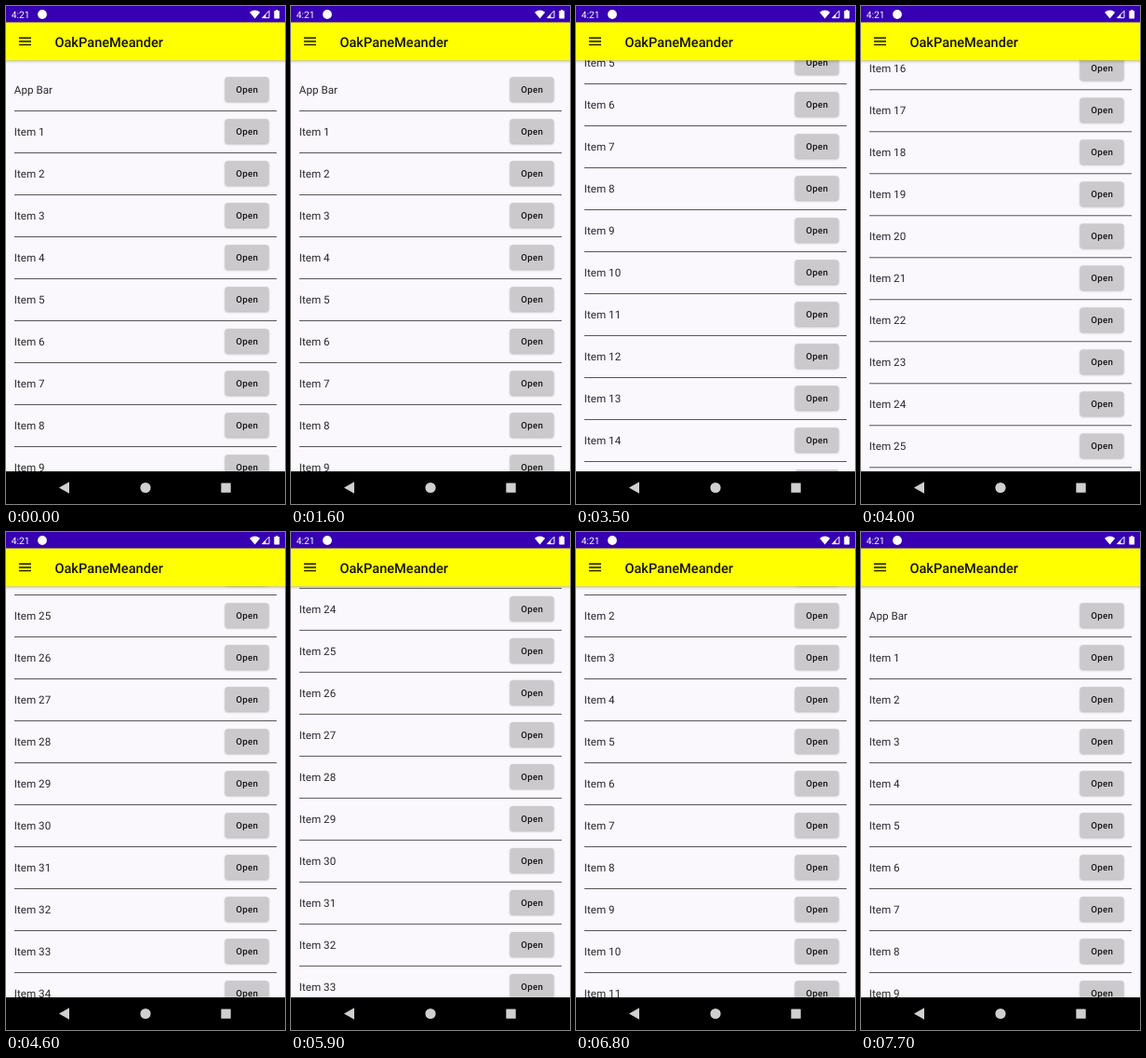
These frames come from a looping animation (300x534 px, 8000 ms). An HTML page:

```html
<!DOCTYPE html>
<html lang="en">
<head>
<meta charset="utf-8">
<title>Scrolling list</title>
<style>
  html, body { margin: 0; width: 100%; height: 100%; overflow: hidden; background: #000; }
  svg { display: block; width: 300px; height: 534px; font-family: Roboto, sans-serif; text-rendering: geometricPrecision; }
  .label { font-size: 11.67px; fill: #29282a; }
  .open { font-size: 9.7px; font-weight: 500; letter-spacing: .3px; text-anchor: middle; fill: #161617; }
  .title { font-size: 14.6px; font-weight: 500; fill: #141400; }
  .clock { font-size: 10.2px; fill: #fff; }
</style>
</head>
<body>
<svg viewBox="0 0 300 534">
  <defs>
    <filter id="soft" x="-20%" y="-30%" width="140%" height="160%">
      <feGaussianBlur stdDeviation="0.8"/>
    </filter>
    <linearGradient id="shade" x1="0" y1="0" x2="0" y2="1">
      <stop offset="0" stop-color="#000" stop-opacity=".3"/>
      <stop offset=".4" stop-color="#000" stop-opacity=".1"/>
      <stop offset="1" stop-color="#000" stop-opacity="0"/>
    </linearGradient>
    <g id="button">
      <rect x="235.6" y="77" width="46.8" height="26.2" rx="2.9" fill="#000" opacity=".3" filter="url(#soft)"/>
      <rect x="235.6" y="76.2" width="46.8" height="26.2" rx="2.9" fill="#cbc9cc"/>
      <text class="open" x="259.2" y="93.2">Open</text>
    </g>
  </defs>

  <rect width="300" height="534" fill="#faf8fc"/>
  <g id="list"></g>

  <rect y="58" width="300" height="4" fill="url(#shade)"/>
  <rect y="17" width="300" height="41.3" fill="#ff0"/>
  <path d="M13.9 34.3H27M13.9 37.9H27M13.9 41.6H27" stroke="#1a1a00" stroke-width="1.45"/>
  <text class="title" x="52.4" y="43.7">OakPaneMeander</text>

  <rect width="300" height="17.5" fill="#3700b3"/>
  <text class="clock" x="5.8" y="13">4:21</text>
  <g fill="#fff">
    <circle cx="39" cy="9" r="4.9"/>
    <path d="M262 6.8Q267.6 2.2 273.2 6.8L267.6 13.4Z"/>
    <path d="M283 5.2V12.7H275.5Z" fill="none" stroke="#fff"/>
    <path d="M279.4 8.8V12.7H275.5Z"/>
    <path d="M290.2 4h2v1h1.3q.6 0 .6.6v7.2q0 .6-.6.6h-4.6q-.6 0-.6-.6V5.6q0-.6.6-.6h1.3z"/>
  </g>

  <rect y="499" width="300" height="35" fill="#000"/>
  <g fill="#d0d0d0">
    <path d="M57 516.5L68 510.2V522.8Z"/>
    <circle cx="150" cy="516.5" r="5.6"/>
    <rect x="231.3" y="511.4" width="10.4" height="10.4" rx=".6"/>
  </g>
</svg>
<script>
  const LOOP = 8000, STEP = 100, ROW = 45, ROWS = 38;
  const list = document.getElementById('list');

  // Each swipe moves the list to a new offset; rise and settle shape its start and end.
  const swipes = [
    { start: 1800, length: 900, to: 119, rise: 2, settle: 2 },
    { start: 3200, length: 1600, to: 1139, rise: 1.79, settle: 2.77 },
    { start: 5700, length: 1400, to: 0, rise: 2.1, settle: 2.75 }
  ];

  const clamp = u => Math.min(1, Math.max(0, u));
  const ease = (u, rise, settle) => 1 - (1 - u ** rise) ** settle;

  function scrollAt(t) {
    return swipes.reduce((y, s) => {
      const u = clamp((t - s.start) / s.length);
      return y + (s.to - y) * ease(u, s.rise, s.settle);
    }, 0);
  }

  function row(n) {
    const name = n ? 'Item ' + n : 'App Bar';
    return `<g transform="translate(0 ${n * ROW})">
      <text class="label" x="8.8" y="94.1">${name}</text>
      <use href="#button"/>
      <rect x="9" y="112" width="282" height="1" fill="#555456"/>
    </g>`;
  }

  list.innerHTML = Array.from({ length: ROWS }, (_, n) => row(n)).join('');

  function draw(now) {
    const t = Math.floor(now % LOOP / STEP) * STEP;
    list.setAttribute('transform', `translate(0 ${-scrollAt(t).toFixed(2)})`);
  }

  const start = performance.now();
  function tick() {
    draw(performance.now() - start);
    requestAnimationFrame(tick);
  }
  tick();
</script>
</body>
</html>
```
